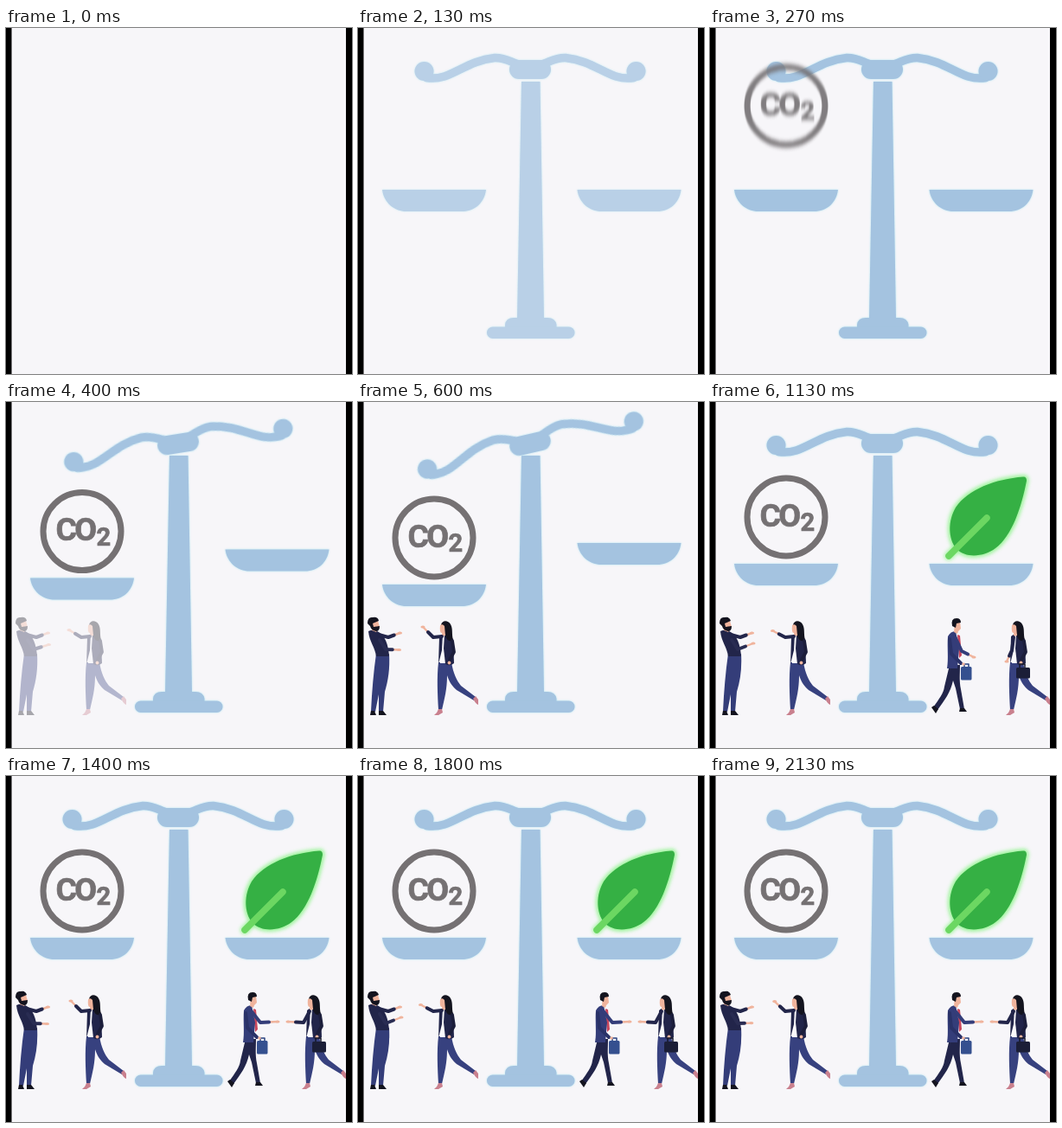
These frames come from a looping animation (400x400 px, 2.2 s). An HTML page:

```html
<!DOCTYPE html>
<html lang="en">
<head>
<meta charset="utf-8">
<title>Balance</title>
<style>
  html, body { margin: 0; width: 100%; height: 100%; overflow: hidden; background: #000; }
  svg { display: block; width: 100vw; height: 100vh; }
  text { font-family: Roboto, "Liberation Sans", sans-serif; font-weight: 700; fill: #757173; stroke: #757173; stroke-width: .7; }
  .steel { fill: #a4c3e0; filter: drop-shadow(0 0 1.2px #b4e6f2); }
  .rod { fill: none; stroke: #a4c3e0; stroke-width: 9.5; stroke-linecap: round; }
  .line { fill: none; stroke-linecap: round; stroke-linejoin: round; }
  .navy { fill: #22254a; }
  .jean { fill: #37417f; }
  .blue { fill: #343d79; }
  .hair { fill: #14141f; }
  .skin { fill: #f0b49d; }
  .shoe { fill: #c9808e; }
  .white { fill: #fbfafc; }
</style>
</head>
<body>
<svg viewBox="0 0 400 400">
  <defs>
    <filter id="co2Blur" x="-20%" y="-20%" width="140%" height="140%"><feGaussianBlur stdDeviation="0"/></filter>
    <filter id="leafBlur" x="-20%" y="-30%" width="140%" height="160%"><feGaussianBlur stdDeviation="0"/></filter>
    <filter id="glow" x="-20%" y="-20%" width="140%" height="140%"><feGaussianBlur stdDeviation="2.2"/></filter>
    <path id="halfBeam" d="M79 57.5C108 62 122 38 158 34.500C172 34 178 41 190 43"/>
    <path id="pan" d="M28 187H148C146 202 135 212 120 212H56C42 212 30 202 28 187Z"/>
    <path id="blade" d="M362 86.500C330 89 298 101 284 122C275 137 275 158 285 170C296 181 317 179 330 169C349 155 360 122 366 91Q366 86 362 86.500Z"/>
    <g id="lady">
      <path class="jean" d="M93 301H108C110 313 114 322 119 328L136 341L134 345L114 333C108 328 105 322 103 316C103 332 100 343 97 356H93C92 338 91 318 93 301Z"/>
      <path class="shoe" d="M93 355H97L98 359L93 362H88Q92 359 93 355ZM133 343L136 340L139 344L139 350Q136 349 133 343Z"/>
      <path class="white" d="M95 272L101 269L102 302H95Z"/>
      <path class="navy" d="M100 269Q108 268 110 275L111 302Q106 306 101 303L99 285Z"/>
      <path class="navy" d="M94 271L98 268L97 287L93 303Z"/>
      <path class="hair" d="M96 258C97 252 104 252 107 257C110 262 108 268 110 275C106 278 102 275 101 270Z"/>
      <path class="skin" d="M95 258Q98 256 100 259L101 270L97 271V267Q94 267 95 258Z"/>
      <path class="line" d="M109 276L111 289L106 298" stroke="#1c1e3b" stroke-width="3.800"/>
      <circle class="skin" cx="105.500" cy="301.500" r="1.900"/>
    </g>
  </defs>

  <rect x="6.500" width="386.500" height="400" fill="#f7f6f9"/>

  <g id="scale">
    <g class="steel">
      <path d="M189 62H210.500L215 336H184Z"/>
      <path d="M170 347V343Q171 335 180 335H219Q228 335 229.500 343V347Z"/>
      <rect x="149" y="345.500" width="101.500" height="13.500" rx="6.750"/>
    </g>
    <g id="beam" class="steel">
      <use href="#halfBeam" class="rod"/>
      <use href="#halfBeam" class="rod" transform="matrix(-1 0 0 1 398 0)"/>
      <circle cx="76.500" cy="50" r="11"/>
      <circle cx="321.500" cy="50" r="11"/>
      <rect x="175" y="37" width="48" height="22" rx="11"/>
    </g>
    <use id="panL" href="#pan" class="steel"/>
    <use id="panR" href="#pan" class="steel"/>
  </g>

  <g id="co2" filter="url(#co2Blur)">
    <circle cx="88" cy="133" r="45" fill="none" stroke="#757173" stroke-width="7"/>
    <text x="57.500" y="143.800" font-size="37.500" letter-spacing="-2.700">CO</text>
    <text x="104.500" y="149" font-size="29">2</text>
  </g>

  <g id="leaf" filter="url(#leafBlur)">
    <g filter="url(#glow)" fill="#8df48a" stroke="#8df48a" stroke-width="5" opacity=".85">
      <use href="#blade"/>
      <path class="line" d="M320 134L276 178" stroke-width="10"/>
    </g>
    <use href="#blade" fill="#35b044"/>
    <path class="line" d="M320 134L276 178" stroke="#6cd762" stroke-width="7.500"/>
  </g>

  <g id="debate">
    <g id="speaker">
      <path class="blue" d="M21 291H36C37 308 35 322 31 335L29 358H24V338L20 358H15C16 335 18 312 21 291Z"/>
      <path class="hair" d="M15 357H19L21 362H14ZM24 357H29L33 362H24Z"/>
      <path class="navy" d="M12 265Q18 262 24 266C31 270 35 280 36 294H21C20 284 13 277 12 265Z"/>
      <path class="skin" d="M15 255L23 253L25 260L21 266L16 264Z"/>
      <path class="hair" d="M11 256Q11 248 17 249Q23 248 24 253L17 256L18 260L25 259Q25 265 21 265Q15 264 14 259Z"/>
    </g>
    <g id="replier"><use href="#lady"/></g>
  </g>

  <g id="deal">
    <g id="seller">
      <path class="navy" d="M277 304H289C289 316 288 322 290 332L294 355H289L284 331L281 322C278 336 271 345 263 356L258 353C265 343 270 337 271 329Z"/>
      <path class="hair" d="M289 354H294L297 358H288ZM259 351L264 355L261 360L256 353Z"/>
      <path class="white" d="M283 266L288 267L291 298L285 300Z"/>
      <path d="M286 269L289 270L291 293L288 296Z" fill="#c8465c"/>
      <path class="blue" d="M275 271Q278 265 284 265L288 285L286 308H274C276 297 274 284 275 271Z"/>
      <path class="skin" d="M283 255L289 254L290 262L287 265L286 268L282 266Z"/>
      <path class="hair" d="M280 259Q278 250 285 250Q290 250 290 255L285 256L284 261Z"/>
      <path class="line" d="M277 274L279 291L290 302" stroke="#2a3268" stroke-width="4"/>
      <path class="line" d="M294 307V303H299V307" stroke="#2b4380" stroke-width="1.500"/>
      <rect x="290" y="306" width="12.500" height="15.500" rx="1.500" fill="#35508f"/>
      <circle class="skin" cx="293" cy="303" r="1.800"/>
    </g>
    <g id="buyer">
      <use href="#lady" x="254"/>
      <path class="line" d="M358 308V303H364V308" stroke="#15172a" stroke-width="1.500"/>
      <rect x="354" y="307" width="16" height="12.500" rx="1.500" fill="#1b1e37"/>
    </g>
  </g>
</svg>
<script>
const LOOP = 2200, STEP = 20 / 3;
const $ = id => document.getElementById(id);
const set = (el, name, value) => el.setAttribute(name, value);

// Keyed tracks: [time, value]
const tracks = {
  scale: [[0, 0], [70, .35], [130, .75], [200, 1]],
  tilt: [[330, 0], [400, -9], [470, -15], [530, -13.5], [600, -13], [670, -13], [730, -5], [800, .7], [870, 0]],
  co2Alpha: [[130, 0], [200, .5], [270, .9], [330, 1]],
  co2Drop: [[200, -76], [270, -43], [330, 0]],
  co2Blur: [[200, 4], [270, 2.6], [330, .8], [400, 0]],
  leafAlpha: [[600, 0], [670, .9], [730, 1]],
  leafDrop: [[600, -150], [670, -75], [730, 0]],
  leafBlur: [[670, 4], [730, 1], [800, 0]],
  debate: [[330, 0], [400, .35], [470, .75], [530, 1]],
  deal: [[870, 0], [930, .35], [1000, .75], [1070, 1]],
  reach: [[1130, 0], [1200, .2], [1270, .6], [1330, .9], [1400, 1]]
};

function at(name, t) {
  const keys = tracks[name];
  const i = keys.findIndex(k => k[0] > t);
  if (i < 0) return keys[keys.length - 1][1];
  if (i === 0) return keys[0][1];
  const [t0, a] = keys[i - 1], [t1, b] = keys[i];
  return a + (b - a) * (t - t0) / (t1 - t0);
}

function make(parent, tag, attrs) {
  const el = document.createElementNS("http://www.w3.org/2000/svg", tag);
  for (const name in attrs) set(el, name, attrs[name]);
  return parent.appendChild(el);
}

const mix = (a, b, k) => a.map((v, i) => v + (b[i] - v) * k);

// Returns a function that poses shoulder, elbow and hand
function arm(owner, color) {
  const stroke = (c, w) => make($(owner), "polyline", { class: "line", stroke: c, "stroke-width": w });
  const skin = stroke("#f0b49d", 2.4), sleeve = stroke(color, 4);
  const palm = make($(owner), "ellipse", { class: "skin", rx: 2.6, ry: 1.6 });
  return (shoulder, elbow, hand) => {
    const wrist = mix(elbow, hand, .5);
    set(skin, "points", [wrist, hand].join(" "));
    set(sleeve, "points", [shoulder, elbow, wrist].join(" "));
    set(palm, "cx", hand[0]);
    set(palm, "cy", hand[1]);
  };
}

const speakerHigh = arm("speaker", "#22254a");
const speakerLow = arm("speaker", "#292c52");
const replierArm = arm("replier", "#22254a");
const sellerArm = arm("seller", "#343d79");
const buyerArm = arm("buyer", "#22254a");

const shift = (id, x, y) => set($(id), "transform", `translate(${x} ${y})`);
const blur = (id, v) => set($(id).firstElementChild, "stdDeviation", `${v * .3} ${v}`);

function draw(t) {
  const tilt = at("tilt", t), sink = -tilt * 24 / 13;
  for (const id of ["scale", "debate", "deal"]) set($(id), "opacity", at(id, t));

  set($("beam"), "transform", `rotate(${tilt} 199 48)`);
  shift("panL", 0, sink);
  shift("panR", 225.5, -sink);

  for (const [id, load] of [["co2", sink], ["leaf", -sink]]) {
    shift(id, 0, at(id + "Drop", t) + load);
    set($(id), "opacity", at(id + "Alpha", t));
    blur(id + "Blur", at(id + "Blur", t));
  }

  const talk = Math.min(1, 1.6 * Math.sin(Math.PI * (t - 600) / 800) ** 2);
  speakerHigh([24, 269], [35, 272], [48.5, 267]);
  speakerLow([25, 275], [32, 286], mix([47.5, 286.5], [50, 279], talk));
  replierArm([97, 271], [87, 272], mix([75, 260], [72.5, 264.5], talk));

  const reach = at("reach", t);
  sellerArm([283, 271], mix([291, 288], [294, 285], reach), mix([305, 295], [314, 284], reach));
  buyerArm([351, 272], mix([349, 287], [344, 285], reach), mix([343, 300], [326, 284], reach));
}

// Hold each pose for a fifteenth of a second, starting on whole hundredths
function hold(t) {
  let n = Math.floor(t / 10 / STEP);
  if (Math.round((n + 1) * STEP) * 10 <= t) n++;
  while (n > 0 && Math.round(n * STEP) * 10 > t) n--;
  return Math.round(n * STEP) * 10;
}

const start = performance.now();
function tick() {
  draw(hold((performance.now() - start) % LOOP));
  requestAnimationFrame(tick);
}
tick();
</script>
</body>
</html>
```
